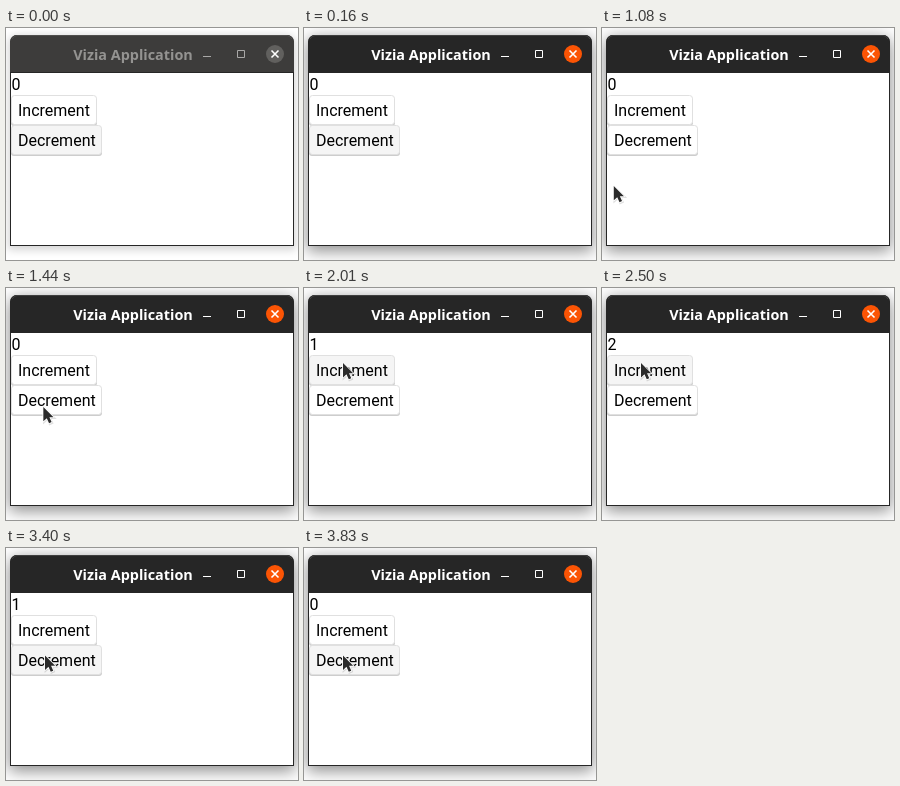
Recreate the animation shown at these times as an HTML page. Size 292 by 232 pixels, loop 4900 ms.

```html
<!DOCTYPE html>
<html lang="en">
<head>
<meta charset="utf-8">
<title>Counter</title>
<style>
  html, body { margin: 0; width: 100%; height: 100%; overflow: hidden; background: #fff; }
  #win {
    position: absolute; left: 4px; top: 7px; width: 284px; height: 211px;
    border-radius: 7px 7px 0 0;
    box-shadow: 0 4px 16px 1px rgba(0, 0, 0, .45);
  }
  svg { position: absolute; left: 0; top: 0; display: block; }
  .frame, .bar { fill: #262626; }
  .edge { stroke: #404040; fill: none; }
  .title { font: bold 14.4px "Noto Sans", "Open Sans", sans-serif; fill: #fff; text-anchor: middle; }
  .icon { stroke: #fff; fill: none; }
  .close { fill: #fb5404; }
  .cross { stroke: #fff; stroke-width: 1.6; }
  .label { font: 16px Roboto, sans-serif; }
  .face { fill: #fff; stroke: #e0e0e0; }
  .hover .face { fill: #f5f5f5; }
  .drop { fill: #cdcdcd; }
  .idle #win { box-shadow: 0 2px 9px 2px rgba(0, 0, 0, .17); }
  .idle .bar { fill: #3d3c3b; }
  .idle .edge { stroke: #504f4e; }
  .idle .title { fill: #949391; }
  .idle .icon { stroke: #a9a8a7; }
  .idle .close { fill: #61605e; }
</style>
</head>
<body class="idle">
<div id="win"></div>
<svg width="292" height="232" viewBox="0 0 292 232">
  <path class="frame" d="M4 218V14a7 7 0 0 1 7-7H281a7 7 0 0 1 7 7V218Z"/>
  <path class="bar" d="M4 44V14a7 7 0 0 1 7-7H281a7 7 0 0 1 7 7V44Z"/>
  <path class="edge" d="M6 11Q8 7.5 11 7.5H281Q284 7.5 286 11"/>
  <rect x="5" y="45" width="282" height="172" fill="#fff"/>
  <text class="title" x="127" y="32">Vizia Application</text>
  <path class="icon" d="M197 28.5H205M231.5 22.5H238.5V29.5H231.5Z"/>
  <circle class="close" cx="269" cy="26" r="9"/>
  <path class="cross" d="M265.5 22.5L272.5 29.5M272.5 22.5L265.5 29.5"/>
  <text class="label" id="count" x="5.6" y="62">0</text>
  <g id="inc">
    <rect class="drop" x="5" y="69" width="86" height="29" rx="3"/>
    <rect class="face" x="5.5" y="67.5" width="85" height="29" rx="3"/>
    <text class="label" x="12" y="88">Increment</text>
  </g>
  <g id="dec">
    <rect class="drop" x="5" y="99" width="91" height="29" rx="3"/>
    <rect class="face" x="5.5" y="97.5" width="90" height="29" rx="3"/>
    <text class="label" x="12" y="118">Decrement</text>
  </g>
  <g id="cursor">
    <path d="M.6 1V16L4.2 12.8 6.600 18 9.4 16.7 7 11.5H11.5Z" stroke="#000" stroke-width="2" opacity=".12"/>
    <path d="M0 0V15L3.6 11.8 6 17 8.6 15.8 6.3 10.8H10.6Z" fill="#2b2b2b" stroke="#fff" stroke-width="1.8" stroke-linejoin="round" paint-order="stroke"/>
  </g>
</svg>
<script>
const LOOP = 4900, FOCUS = 160, STEP = 40, HOLD = 170;
const $ = id => document.getElementById(id);

const easeIn = k => k ** 1.45;
const easeOut = k => 1 - easeIn(1 - k);
const smooth = k => k * k * (3 - 2 * k);

// where the pointer rests
const outside = [-13, 162], below = [36, 154], onInc = [39, 75], onDec = [39, 107.5];

const moves = [
  { start: 920, steps: 8, from: outside, to: below, ease: easeIn },
  { start: 1400, steps: 6, from: below, to: onInc, ease: easeOut },
  { start: 2890, steps: 5, from: onInc, to: onDec, ease: smooth }
];

const clicks = [
  { time: 1830, add: 1 },
  { time: 2320, add: 1 },
  { time: 3220, add: -1 },
  { time: 3660, add: -1 }
];

// The pointer advances once per STEP while it moves.
function pointer(t) {
  const move = moves.filter(m => m.start <= t).pop();
  if (!move) return outside;
  const done = Math.floor((t - move.start) / STEP) + 1;
  const k = move.ease(Math.min(1, done / move.steps));
  return move.from.map((v, i) => v + (move.to[i] - v) * k);
}

// Hover reacts one step late; Decrement stays lit until the pointer enters.
function hoverAt(t) {
  if (t < moves[0].start) return "dec";
  const y = pointer(t - STEP)[1];
  return y < 97 ? "inc" : y < 128 ? "dec" : "";
}

function draw(t) {
  const past = clicks.filter(c => c.time <= t);
  const pressed = past.some(c => t < c.time + HOLD);
  const hovered = hoverAt(t);
  document.body.classList.toggle("idle", t < FOCUS);
  $("count").textContent = past.reduce((sum, c) => sum + c.add, 0);
  for (const id of ["inc", "dec"]) {
    const over = id === hovered;
    $(id).setAttribute("class", over ? "hover" : "");
    $(id).setAttribute("transform", `translate(0 ${over && pressed ? 1 : 0})`);
  }
  $("cursor").setAttribute("transform", `translate(${pointer(t)}) scale(.96)`);
}

const start = performance.now();
function tick() {
  draw((performance.now() - start) % LOOP);
  requestAnimationFrame(tick);
}
tick();
</script>
</body>
</html>
```
